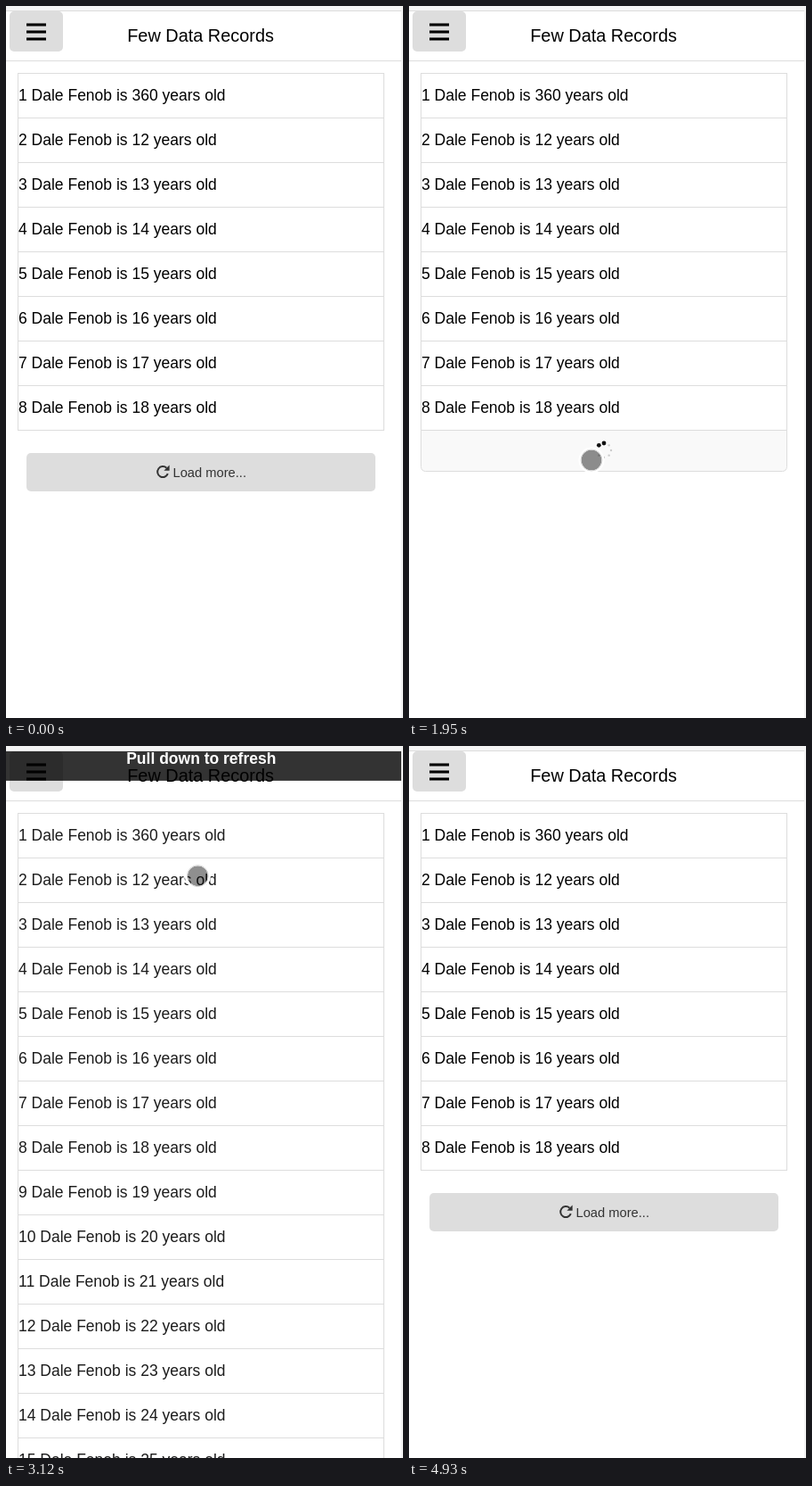
Recreate the animation shown at these times as an HTML page. Size 446 by 798 pixels, loop 5480 ms.

```html
<!DOCTYPE html>
<html>
<head>
<meta charset="utf-8">
<style>
  html, body { margin: 0; width: 100%; height: 100%; overflow: hidden; background: #fff; }
  svg { display: block; }
  text { font-family: "Liberation Sans", Arial, sans-serif; font-size: 17.5px; }
  .line { fill: none; stroke: #ddd; }
  .label { font-weight: bold; fill: #fff; text-anchor: middle; }
</style>
</head>
<body>
<svg id="stage" width="446" height="798">
  <rect width="446" height="6" fill="#f5f5f5"/>
  <path class="line" d="M0 5.5H444M0 61.5H444"/>
  <rect x="4" y="6" width="60" height="45" rx="5" fill="#ddd"/>
  <path d="M23 21h22M23 29h22M23 37h22" stroke="#888" stroke-width="4"/>
  <path d="M23 21h22M23 29h22M23 37h22" stroke="#000" stroke-width="2.4"/>
  <text x="136.2" y="40" style="font-size:19.9px">Few Data Records</text>

  <g id="rows"></g>
  <g id="more">
    <rect x="23" y="501" width="392" height="43" rx="5" fill="#ddd"/>
    <path d="M181.8 524.2A6 6 0 1 1 180.4 517.8" fill="none" stroke="#333" stroke-width="2"/>
    <path d="M183.6 514.6v6.2h-6.2z" fill="#333"/>
    <text x="187.5" y="528" fill="#333" style="font-size:14.7px">Load more...</text>
  </g>
  <g id="loader">
    <path d="M13.5 475.5H424.5V516.5a5 5 0 0 1-5 5H18.5a5 5 0 0 1-5-5z" fill="#f9f9f9" stroke="#ddd"/>
    <g id="dots"></g>
  </g>
  <rect id="thumb" x="425" y="62" width="17" height="602" fill="#d9d9d9"/>
  <rect x="444" width="2" height="798" fill="#f3f3f3"/>

  <svg id="pull" y="6" width="444">
    <rect width="444" height="100%" fill="#000" fill-opacity=".8"/>
    <g id="hint">
      <g id="arrow" fill="none" stroke="#fff" stroke-width="2.2">
        <path d="M214.5-62.5l5-5 5 5"/>
        <path d="M219.5-67V-49" stroke-dasharray="6 2 3 2"/>
      </g>
      <path id="ellipsis" d="M208.5-53.5h5m3 0h5m3 0h5" stroke="#fff" stroke-width="3"/>
      <text id="label" class="label" x="219.3" y="-19"></text>
    </g>
  </svg>

  <g id="cursor">
    <circle r="11.5" fill-opacity=".44"/>
    <circle r="13" fill="none" stroke="#fff" stroke-width="3"/>
    <circle r="12" fill="none" stroke="#ccc" stroke-width=".8"/>
  </g>
</svg>
<script>
const LOOP = 5480;
const el = {};
document.querySelectorAll('[id]').forEach(e => el[e.id] = e);

const row = i => {
  const y = 75.5 + 50 * i;
  return `<g><rect class="line" x="13.5" y="${y}" width="411" height="50"/>
    <text x="14" y="${y + 30.5}">${i + 1} Dale Fenob is ${i ? 11 + i : 360} years old</text></g>`;
};
el.rows.innerHTML = Array.from({ length: 15 }, (_, i) => row(i)).join('');

el.dots.innerHTML = Array.from({ length: 8 }, (_, i) => {
  const a = (i - 3) * Math.PI / 4, dark = i < 2;
  return `<circle cx="${219 + 8 * Math.cos(a)}" cy="${498 + 8 * Math.sin(a)}"
    r="${dark ? 2.4 : 1.2}" fill="${dark ? '#111' : '#ccc'}"/>`;
}).join('');

const linear = f => f;
const smooth = f => f * f * (3 - 2 * f);
const easeOut = f => 1 - (1 - f) ** 2;

// Progress in n discrete steps, the first at t0 and the last at t1
const stepped = (t, t0, t1, n) =>
  t < t0 ? 0 : Math.min(n, Math.floor((t - t0) / (t1 - t0) * (n - 1) + 0.02) + 1) / n;

// Cursor moves: start, end, steps, easing, points (line or cubic curve)
const moves = [
  [70, 550, 7, smooth, [337, 830], [219, 100]],
  [630, 850, 4, linear, [219, 100], [189, 48]],
  [1020, 1540, 8, easeOut, [189, 48], [145, -90], [193, 459], [206, 527]],
  [1640, 1720, 2, linear, [206, 527], [205, 509]],
  [2240, 2730, 7, smooth, [205, 509], [216, 60]],
  [2810, 2811, 1, linear, [216, 60], [216, 58]],
  [2970, 3450, 7, smooth, [216, 58], [213, 500]],
  [4560, 4930, 6, linear, [213, 500], [375, 840]],
];

const mix = (a, b, u) => a.map((v, i) => v + (b[i] - v) * u);
const along = (points, u) => points.length === 1 ? points[0]
  : along(points.slice(1).map((p, i) => mix(points[i], p, u)), u);

function cursorAt(t) {
  const move = moves.filter(m => t >= m[0]).pop() || moves[0];
  const [t0, t1, n, ease, ...points] = move;
  return along(points, ease(stepped(t, t0, t1, n)));
}

const show = (e, on) => e.style.display = on ? '' : 'none';

function draw(t) {
  const full = t >= 2240 && t < 4000;
  const released = t >= 3850;
  [...el.rows.children].forEach((r, i) => show(r, full || i < 8));
  el.rows.setAttribute('fill', full ? '#1c1c1c' : '#000');
  show(el.more, t < 1950 || t >= 4000);
  show(el.loader, t >= 1950 && t < 2240);
  show(el.thumb, t >= 2240 && t < 2970);

  const height = released
    ? 63 + 103 * (1 - stepped(t, 3850, 4070, 4)) ** 2
    : 166 * smooth(stepped(t, 2970, 3450, 7));
  show(el.pull, t >= 2970 && t < 4220);
  el.pull.setAttribute('height', height);
  el.hint.setAttribute('transform', `translate(0 ${height})`);
  show(el.arrow, !released);
  show(el.ellipsis, released);
  const turn = 180 * (1 - stepped(t, 3300, 3520, 4));
  el.arrow.setAttribute('transform', `rotate(${turn} 219.5 -58.5)`);
  el.label.textContent = released ? 'Refreshing'
    : t >= 3290 ? 'Release to refresh' : 'Pull down to refresh';

  el.cursor.setAttribute('transform', `translate(${cursorAt(t)})`);
}

function tick() {
  draw(performance.now() % LOOP);
  requestAnimationFrame(tick);
}
tick();
</script>
</body>
</html>
```
